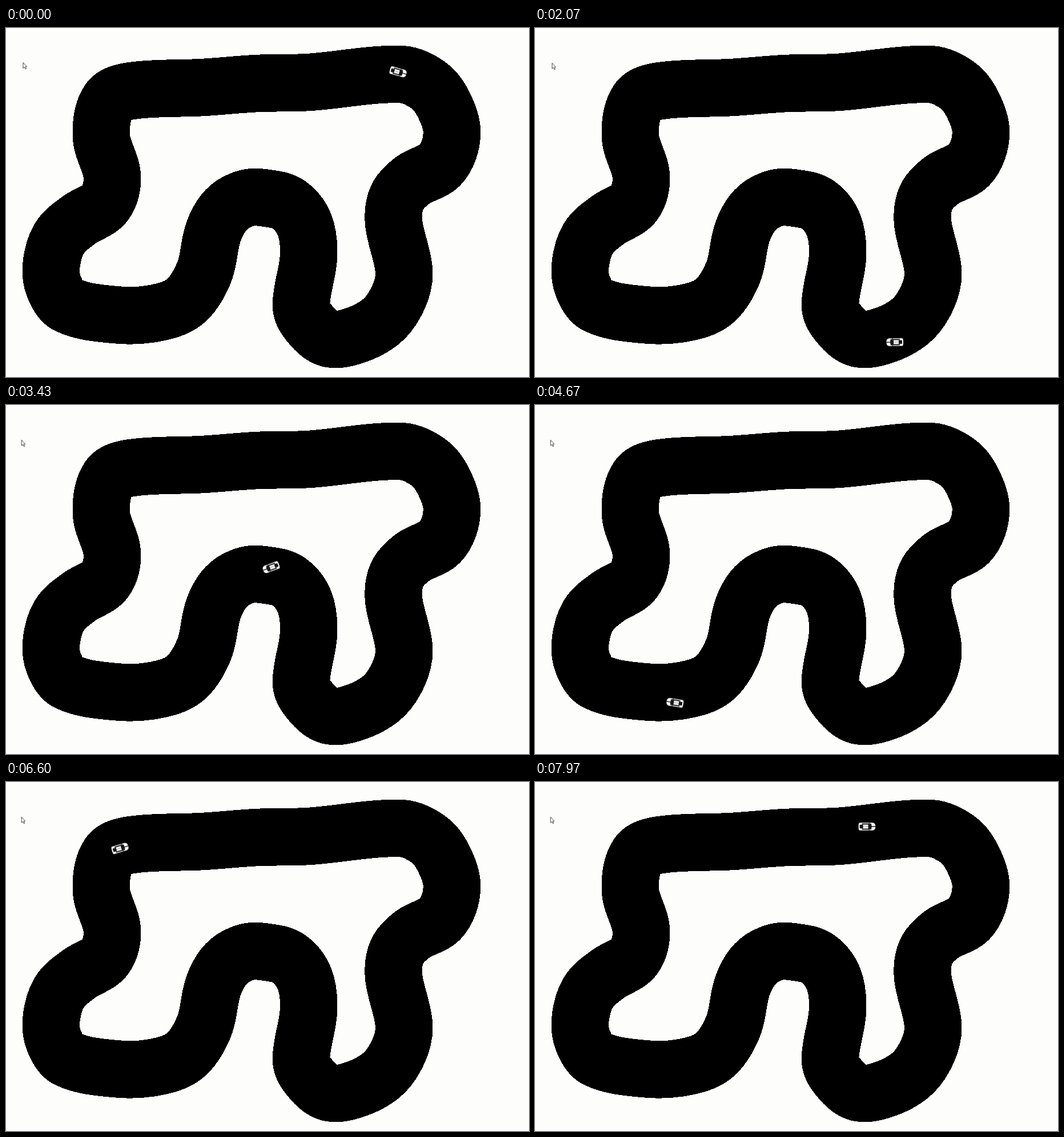
An HTML page for the animation above (8 s loop, 916 by 611 pixels).

```html
<!DOCTYPE html>
<html lang="en">
<head>
<meta charset="utf-8">
<title>Race track</title>
<style>
  html, body { margin: 0; width: 100%; height: 100%; overflow: hidden; background: #fdfdfb; }
  svg { display: block; width: 100%; height: 100%; }
  #track { fill: none; stroke: #000; stroke-width: 100.5; stroke-linejoin: round; shape-rendering: crispEdges; }
  #cursor { animation: nudge 8s step-end infinite; }
  @keyframes nudge {
    0% { transform: translate(29.5px, 60px); }
    21% { transform: translate(29.5px, 60.7px); }
    28.5% { transform: translate(26.7px, 60.7px); }
  }
</style>
</head>
<body>
<svg viewBox="0 0 916 611">
  <path id="track"/>
  <path id="cursor" d="M.5 .5V10.5L2.8 8.3 4.6 12 6 11.3 4.4 7.8H7Z" fill="#fff" stroke="#333" stroke-width=".9"/>
  <g id="car">
    <path d="M-13.5-6.7H10Q14.7-6 14.7 0T10 6.7H-13.5Q-15 6-15 0T-13.5-6.7Z" fill="#fcfcfc"/>
    <path d="M-13-3-7-3.5V3.5L-13 3ZM2-4 7-5.5Q9 0 7 5.5L2 4Z" fill="#141414"/>
    <path d="M-9-4.4H4M-9 4.4H4" stroke="#1c1c1c" stroke-width="2"/>
    <path d="M8 0H15M4-7.8V-5M4 7.8V5" stroke="#222" stroke-width="1.4"/>
    <path d="M-7 0H2" stroke="#999"/>
  </g>
</svg>
<script>
  const LOOP = 8000, FRAME = 100 / 3;

  // the road is a wide brush drawn through these points
  const bends = `220,110 345,104 440,97 530,95 690,81 738,99 766,133 781,185 762,238 712,267
    685,297 679,340 697,425 688,470 658,513 606,540 563,543 529,514 517,485 530,400 523,345
    495,309 457,298 421,298 386,318 363,358 347,428 312,480 257,500 190,502 108,485 83,450
    80,410 95,366 128,336 173,307 186,260 167,190 180,128`
    .split(/\s+/).map(pair => pair.split(',').map(Number));

  // closed smooth curve; handles follow the line between each point's neighbours
  function smooth(points) {
    const at = i => points[(i + points.length) % points.length];
    const gap = (a, b) => Math.hypot(b[0] - a[0], b[1] - a[1]);
    const handle = (i, length) => {
      const before = at(i - 1), after = at(i + 1), scale = length / 3 / gap(before, after);
      return at(i).map((v, k) => v + (after[k] - before[k]) * scale);
    };
    const curves = points.map((p, i) => {
      const length = gap(p, at(i + 1));
      return 'C' + [handle(i, length), handle(i + 1, -length), at(i + 1)].join(' ');
    });
    return `M${points[0]}${curves.join('')}Z`;
  }
  document.getElementById('track').setAttribute('d', smooth(bends));

  // each leg of the drive: end time and curve, run at an even speed
  let start = 0;
  const legs = [
    [900, 'M687 77C790 105 829 246 760 258'],
    [2070, 'M760 258C700 268 674 325 678 390S705 550 629 550'],
    [3430, 'M629 550C560 550 512 520 520 440S540 257 465 284'],
    [4670, 'M465 284C405 306 375 345 362 400S318 534 244 521'],
    [6600, 'M244 521C170 508 70 480 76 395S196 305 176 200S167 126 200 116'],
    [LOOP, 'M200 116C300 86 460 78 591 78']
  ].map(([end, d]) => {
    const path = document.createElementNS('http://www.w3.org/2000/svg', 'path');
    path.setAttribute('d', d);
    const leg = { start, end, path, length: path.getTotalLength() };
    start = end;
    return leg;
  });

  function pose(time) {
    const { start, end, path, length } = legs.find(leg => time < leg.end);
    const s = length * (time - start) / (end - start);
    const p = path.getPointAtLength(s);
    const a = path.getPointAtLength(s - 2), b = path.getPointAtLength(s + 2);
    return [p.x, p.y, Math.atan2(b.y - a.y, b.x - a.x) * 180 / Math.PI];
  }

  const car = document.getElementById('car');

  function draw() {
    const step = Math.floor((performance.now() % LOOP + 5) / FRAME) % 240;
    const [x, y, angle] = pose(step * FRAME);
    car.setAttribute('transform', `translate(${x} ${y}) rotate(${angle})`);
    requestAnimationFrame(draw);
  }
  draw();
</script>
</body>
</html>
```
